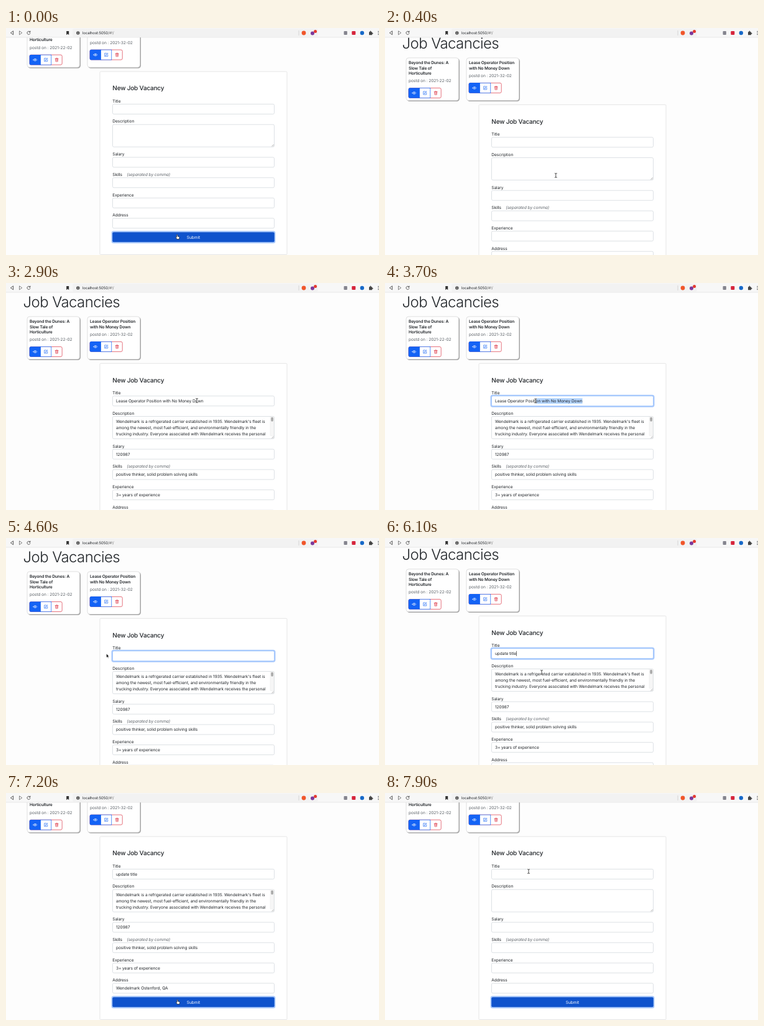
An HTML page that plays this animation: 600 px wide and 365 px high, repeating every 8 s.

```html
<!DOCTYPE html>
<html lang="en">
<head>
<meta charset="utf-8">
<title>Job Vacancies</title>
<style>
  html, body { margin: 0; width: 100%; height: 100%; overflow: hidden; background: #fdfdfd; }
  svg { display: block; width: 100vw; height: 100vh; }
  text { font-family: Inter, "Open Sans", sans-serif; font-size: 6.6px; letter-spacing: -.01em; fill: #212529; text-rendering: geometricPrecision; white-space: pre; }
  .hero { font-size: 24px; font-weight: 300; letter-spacing: -.025em; }
  .heading { font-size: 10px; font-weight: 500; letter-spacing: -.02em; }
  .card-title { font-weight: 600; letter-spacing: -.02em; }
  .muted { fill: #5c6268; }
  .hint { fill: #5c6268; font-style: italic; }
  .url { font-size: 6px; }
  .box { fill: #fff; stroke: #ced4da; stroke-width: .7; }
  .line { fill: none; stroke-linecap: round; stroke-linejoin: round; }
</style>
</head>
<body>
<svg id="stage" viewBox="0 0 600 365"></svg>
<script>
const NS = "http://www.w3.org/2000/svg";
const stage = document.getElementById("stage");
const LOOP = 8000, STEP = 100;
const BLUE = "#1463f5", DARK_BLUE = "#0f53cc", RED = "#dc3545";

function add(parent, tag, attrs = {}, content) {
  const el = document.createElementNS(NS, tag);
  for (const name in attrs) el.setAttribute(name, attrs[name]);
  if (content !== undefined) el.textContent = content;
  return parent.appendChild(el);
}
const group = (parent, attrs) => add(parent, "g", attrs);
const rect = (parent, x, y, width, height, attrs) => add(parent, "rect", { x, y, width, height, ...attrs });
const text = (parent, x, y, content, cls = "") => add(parent, "text", { x, y, class: cls }, content);
const path = (parent, d, attrs) => add(parent, "path", { d, ...attrs });
const circle = (parent, cx, cy, r, fill) => add(parent, "circle", { cx, cy, r, fill });
const show = (el, on) => el.setAttribute("visibility", on ? "visible" : "hidden");

const ICONS = {
  eye: "M1 8C4 2.5 12 2.5 15 8C12 13.5 4 13.5 1 8ZM8 5.7A2.3 2.3 0 1 0 8 10.3A2.3 2.3 0 1 0 8 5.7",
  edit: "M9 2H2V14H14V8M6 10L6.7 7.5L13 1.2L15 3.2L8.6 9.5Z",
  trash: "M2 3.5H14M6 3.5V1.5H10V3.5M3.5 3.5L4 14.5H12L12.5 3.5M6.3 6V12M9.7 6V12"
};
function icon(parent, name, x, y, color) {
  return path(parent, ICONS[name], {
    class: "line", stroke: color, "stroke-width": 1.5,
    transform: `translate(${x - 3.4} ${y - 3.4}) scale(.425)`
  });
}

// Page
rect(stage, 0, 0, 600, 365, { fill: "#fdfdfd" });
const page = group(stage);
text(page, 27.5, 38.8, "Job Vacancies", "hero");

function vacancyCard(x, lines, date) {
  const left = x + 4, end = 64.4 + lines.length * 8.1;
  rect(page, x + 1, 55, 85, 69, { rx: 4.5, fill: "#a3a3a3" });
  rect(page, x, 54, 84.5, 68.6, { rx: 4, fill: "#fff", stroke: "#d2d2d2", "stroke-width": .7 });
  lines.forEach((line, i) => text(page, left, 64.4 + i * 8.1, line, "card-title"));
  text(page, left, end + 4.5, "postd on : " + date, "muted");
  const top = end + 13.8, mid = top + 8;
  rect(page, left, top, 52.2, 16, { rx: 2.2, fill: "#fff", stroke: RED, "stroke-width": .7 });
  const edit = rect(page, left + 17.4, top, 17.4, 16, { fill: "#fff", stroke: BLUE, "stroke-width": .7 });
  path(page, `M${left + 17.6} ${top - .3}h-15.4q-2.5 0-2.5 2.5v11.6q0 2.5 2.5 2.5h15.4z`, { fill: BLUE });
  icon(page, "eye", left + 8.8, mid, "#fff");
  const editIcon = icon(page, "edit", left + 26.2, mid, BLUE);
  icon(page, "trash", left + 43.6, mid, RED);
  return { edit, editIcon };
}
vacancyCard(34, ["Beyond the Dunes: A", "Slow Tale of", "Horticulture"], "2021-22-02");
const leaseCard = vacancyCard(131, ["Lease Operator Position", "with No Money Down"], "2021-32-02");

// Form
rect(page, 151, 129.3, 301, 294.5, { rx: 1.5, fill: "#fff", stroke: "#dcdcdc", "stroke-width": .7 });
text(page, 171.3, 159.8, "New Job Vacancy", "heading");

function focusRing(y) {
  return rect(page, 170.5, y - 1, 262, 18, { rx: 2.6, fill: "none", stroke: "#a9c9fc", "stroke-width": 2 });
}
function field(label, y, height = 16) {
  text(page, 171.3, y - 2.7, label);
  return rect(page, 171.5, y, 260, height, { rx: 2, class: "box" });
}
const titleRing = focusRing(181.7);
const titleBox = field("Title", 181.7);
field("Description", 214.5, 36);
field("Salary", 267.2);
field("Skills", 300);
field("Experience", 332.6);
field("Address", 365.2);
text(page, 194.3, 297.3, "(separated by comma)", "hint");
path(page, "M427.6 249.4l2.8-2.8M429.4 249.4l1-1", { class: "line", stroke: "#777", "stroke-width": .5 });

const filled = group(page);
[
  [225, "Wendelmark is a refrigerated carrier established in 1935. Wendelmark's fleet is"],
  [235.2, "among the newest, most fuel-efficient, and environmentally friendly in the"],
  [245.3, "trucking industry. Everyone associated with Wendelmark receives the personal"],
  [277.6, "120987"],
  [310.4, "positive thinker, solid problem solving skills"],
  [343, "3+ years of experience"],
  [375.6, "Wendelmark Ostenford, QA"]
].forEach(([y, line]) => text(filled, 177, y, line));
rect(filled, 425, 215, 6, 30.5, { fill: "#f6f6f6", stroke: "#e6e6e6", "stroke-width": .4 });
rect(filled, 426.3, 215.8, 3.6, 7, { rx: 1.8, fill: "#a9a9a9" });

const selection = rect(page, 177, 185.2, 0, 9, { fill: "#b4d5fe" });
const titleText = text(page, 177, 192.1, "");
const caret = rect(page, 177, 185.8, .6, 8, { fill: "#111" });

const submitRing = focusRing(387.6);
const submit = rect(page, 171.2, 387.6, 260.6, 16, { rx: 2 });
add(page, "text", { x: 301.5, y: 398, "text-anchor": "middle", style: "fill:#fff" }, "Submit");

// Browser bar
rect(stage, 0, 0, 600, 15, { fill: "#f7f7f7" });
rect(stage, 107, 1, 395, 13, { rx: 2, fill: "#f2f2f2" });
rect(stage, 0, 14.7, 600, .6, { fill: "#dadada" });
const bar = group(stage, { class: "line", stroke: "#4a4a4a", "stroke-width": .9 });
path(bar, "M11.7 5.2V10.8L7.7 8Z");
path(bar, "M21.5 5.2V10.8L25.5 8Z", { stroke: "#777" });
path(bar, "M38.6 6.2A2.6 2.6 0 1 0 39 8.7M39 5V6.8H37.1");
path(stage, "M97.2 5h4v6.2l-2-1.7-2 1.7z", { fill: "#333" });
circle(stage, 115.8, 8, 2.7, "#555");
path(stage, "M115.8 7.6v1.9M115.8 6.2v.5", { stroke: "#fff", "stroke-width": .7 });
const url = text(stage, 122.8, 10.1, "localhost:5050", "url");
add(url, "tspan", { fill: "#666" }, "/#!/");
rect(stage, 470.7, 4, .6, 8, { fill: "#c4c4c4" });
circle(stage, 479, 8, 3.4, "#f0562b");
circle(stage, 493, 8.4, 3, "#7b3a9c");
circle(stage, 497.6, 5.6, 2.5, "#e5392f");
rect(stage, 543.5, 5, 5.4, 6, { rx: 1, fill: "#85858f" });
rect(stage, 556.3, 5, 6, 6, { rx: 1.2, fill: "#d6253c" });
circle(stage, 572.8, 8, 3.2, "#1769c8");
path(stage, "M584 6.2h1.5q-.4-1.7.9-1.7t.9 1.7h1.6v1.6q1.6-.4 1.6.9t-1.6.9v1.7h-4.9z", { fill: "#444" });
[5.5, 8, 10.5].forEach(y => rect(stage, 598, y - .4, 2, .8, { fill: "#555" }));

// Mouse pointers, each with its hot spot at 0,0
const pointer = group(stage);
const shapes = { ibeam: group(pointer), arrow: group(pointer), hand: group(pointer) };
for (const [color, width] of [["#fff", 1.8], ["#222", .8]])
  path(shapes.ibeam, "M-1.5-3.4Q0-3.4 0-2.6Q0-3.4 1.5-3.4M0-2.8V2.8M-1.5 3.4Q0 3.4 0 2.6Q0 3.4 1.5 3.4",
    { class: "line", stroke: color, "stroke-width": width });
path(shapes.arrow, "M0 0V6.4L1.5 5.1L2.5 7.3L3.5 6.9L2.5 4.7H4.5Z", { fill: "#111", stroke: "#fff", "stroke-width": .5 });
path(shapes.hand, "M-1.4-3.4Q-.7-4.2 0-3.4V-1L2.6-.3Q3.1 0 3 1L2.5 3.6H-.9L-3 .6Q-2.8-.5-1.4.5Z",
  { fill: "#fff", stroke: "#222", "stroke-width": .7 });

// Timeline: [time, value...]
const SCROLL = [[0, 59.3], [100, 53], [200, 36], [300, 17], [400, 6], [500, 2], [600, 0],
  [6000, 0], [6100, 4], [6300, 33], [6500, 54.6], [6700, 59.3]];
const POINTER = [
  [0, 276, 336, "hand"], [100, 276, 328, "ibeam"], [400, 274.8, 237, "ibeam"], [700, 236, 135, "arrow"],
  [900, 203, 98, "arrow"], [1000, 200, 95, "arrow"], [1200, 148, 75, "ibeam"], [1400, 152, 66, "ibeam"],
  [1800, 152, 66, "ibeam"], [1900, 153, 82, "ibeam"], [2200, 161, 102, "hand"], [2500, 161, 102, "hand"],
  [2600, 190, 120, "arrow"], [2900, 307, 189, "ibeam"], [3200, 322, 189.5, "ibeam"], [3400, 322, 189.5, "ibeam"],
  [4000, 162.5, 189.5, "arrow"], [4200, 161.5, 186, ""], [4600, 161.5, 186, "arrow"], [4700, 174, 191, "ibeam"],
  [5100, 252, 218, "ibeam"], [5300, 252, 218, ""], [6100, 252, 216, "ibeam"], [6500, 274.6, 156, "ibeam"],
  [6900, 276.5, 336, "hand"], [7800, 276.5, 336, "hand"], [7900, 231, 126, "ibeam"]
];
const TITLE = [[0, ""], [2400, "Lease Operator Position with No Money Down"], [4200, ""], [5300, "update"],
  [5500, "update t"], [5600, "update tit"], [5700, "update title"], [7300, ""]];

const lastKey = (keys, t) => keys.findLastIndex(key => key[0] <= t);
function tween(keys, t, column = 1) {
  const i = lastKey(keys, t), a = keys[i], b = keys[i + 1];
  return b ? a[column] + (b[column] - a[column]) * (t - a[0]) / (b[0] - a[0]) : a[column];
}
const within = (t, from, to) => t >= from && t < to;

function draw(t) {
  page.setAttribute("transform", `translate(0 ${-tween(SCROLL, t)})`);

  const x = tween(POINTER, t, 1), y = tween(POINTER, t, 2);
  const kind = POINTER[lastKey(POINTER, t)][3];
  pointer.setAttribute("transform", `translate(${x} ${y})`);
  for (const name in shapes) show(shapes[name], name === kind);

  const editHover = within(t, 2200, 2600);
  leaseCard.edit.setAttribute("fill", editHover ? BLUE : "#fff");
  leaseCard.editIcon.setAttribute("stroke", editHover ? "#fff" : BLUE);

  show(filled, within(t, 2400, 7300));
  const title = TITLE[lastKey(TITLE, t)][1];
  if (titleText.textContent !== title) titleText.textContent = title;
  const end = 177 + (title ? titleText.getComputedTextLength() : 0);

  const titleFocus = within(t, 3400, 7200);
  show(titleRing, titleFocus);
  titleBox.style.stroke = titleFocus ? "#86b7fe" : "";
  const start = Math.min(end, Math.max(177, x));
  show(selection, within(t, 3500, 4200));
  selection.setAttribute("x", start);
  selection.setAttribute("width", end - start);
  show(caret, within(t, 4200, 4600) || within(t, 5300, 7200));
  caret.setAttribute("x", end + .2);

  const submitFocus = t < 2400 || t >= 7200;
  show(submitRing, submitFocus);
  submit.setAttribute("fill", submitFocus || t >= 6900 ? DARK_BLUE : BLUE);
}

function tick(now) {
  draw(Math.floor(now % LOOP / STEP) * STEP);
  requestAnimationFrame(tick);
}
draw(0);
requestAnimationFrame(tick);
</script>
</body>
</html>
```
